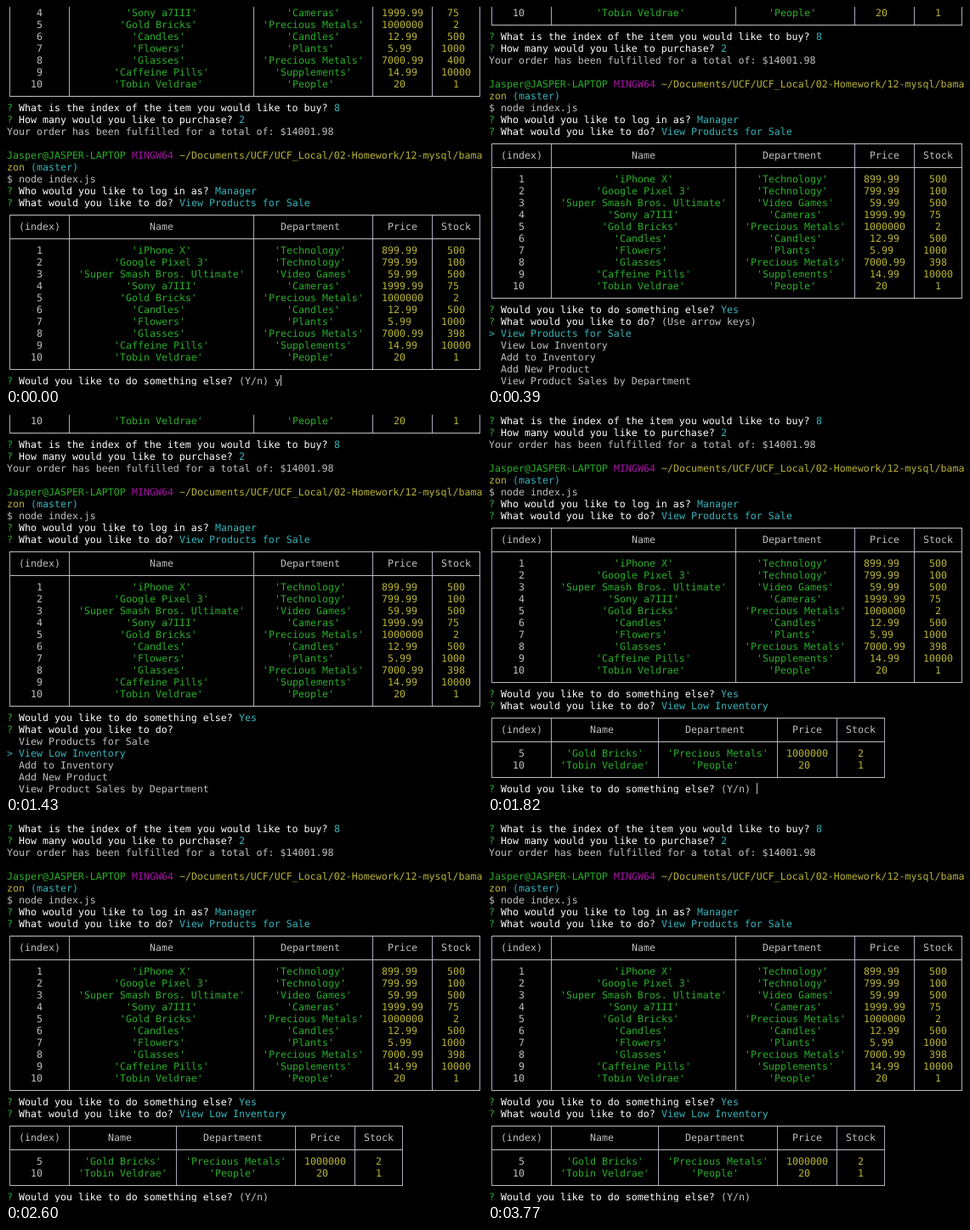
An HTML page for the animation above (3.9 s loop, 560 by 448 pixels).

```html
<!DOCTYPE html>
<html lang="en">
<head>
<meta charset="utf-8">
<title>Store manager terminal</title>
<style>
  html, body { margin: 0; width: 100%; height: 100%; overflow: hidden; background: #000; }
  svg { display: block; width: 560px; height: 448px; background: #000; }
  text {
    font: 11.627px "DejaVu Sans Mono", "Liberation Mono", monospace;
    text-rendering: geometricPrecision;
    white-space: pre;
  }
  path { fill: none; stroke-width: 1; shape-rendering: crispEdges; }
  .bars { stroke: #aca6b8; }
  .rule { stroke: #bfbfbf; }
</style>
</head>
<body>
<svg id="stage" viewBox="0 0 560 448"></svg>
<script>
const NS = 'http://www.w3.org/2000/svg';
const CELL_W = 7, CELL_H = 14, PAD = 1, ROWS = 32;
const LOOP = 3900, BLINK = 530;
const GREY = '#bfbfbf', WHITE = '#ffffff', GREEN = '#2aae2a',
      YELLOW = '#b8b435', CYAN = '#34b4ba', MAGENTA = '#a414a4';

const stage = document.getElementById('stage');
const colX = col => PAD + col * CELL_W;

function add(parent, tag, attrs, content) {
  const el = document.createElementNS(NS, tag);
  for (const key in attrs) el.setAttribute(key, attrs[key]);
  if (content) el.textContent = content;
  return parent.appendChild(el);
}

// A line holds text runs, plus table borders where it has any.
function line(...pairs) {
  const runs = [];
  let col = 0;
  for (const [color, text] of pairs) {
    runs.push({ col, color, text });
    col += text.length;
  }
  return { runs };
}

const ask = (question, answer = '', color = CYAN) =>
  line([GREEN, '? '], [WHITE, question + ' '], [color, answer]);

const HEADER = ['(index)', 'Name', 'Department', 'Price', 'Stock'];

function table(items) {
  const all = [HEADER, ...items];
  const widths = HEADER.map((_, i) => Math.max(...all.map(r => r[i].length)) + 2);
  const bars = [0];
  widths.forEach(w => bars.push(bars[bars.length - 1] + w + 1));

  const row = (cells, header) => ({
    bars, edge: 'row',
    runs: cells.map((text, i) => ({
      text,
      col: bars[i] + 1 + Math.floor((widths[i] - text.length) / 2),
      color: header || i === 0 ? GREY : text[0] === "'" ? GREEN : YELLOW
    }))
  });
  const border = edge => ({ bars, edge, runs: [] });

  return [border('top'), row(HEADER, true), border('middle'),
          ...items.map(item => row(item)), border('bottom')];
}

const products = glasses => [
  ['iPhone X', 'Technology', '899.99', '500'],
  ['Google Pixel 3', 'Technology', '799.99', '100'],
  ['Super Smash Bros. Ultimate', 'Video Games', '59.99', '500'],
  ['Sony a7III', 'Cameras', '1999.99', '75'],
  ['Gold Bricks', 'Precious Metals', '1000000', '2'],
  ['Candles', 'Candles', '12.99', '500'],
  ['Flowers', 'Plants', '5.99', '1000'],
  ['Glasses', 'Precious Metals', '7000.99', glasses],
  ['Caffeine Pills', 'Supplements', '14.99', '10000'],
  ['Tobin Veldrae', 'People', '20', '1']
].map(([name, dept, price, stock], i) =>
  [String(i + 1), `'${name}'`, `'${dept}'`, price, stock]);

const stock = products('398');
const history = [
  ...table(products('400')),
  ask('What is the index of the item you would like to buy?', '8'),
  ask('How many would you like to purchase?', '2'),
  line([GREY, 'Your order has been fulfilled for a total of: $14001.98']),
  line(),
  line([GREEN, 'Jasper@JASPER-LAPTOP '], [MAGENTA, 'MINGW64 '],
       [YELLOW, '~/Documents/UCF/UCF_Local/02-Homework/12-mysql/bama']),
  line([YELLOW, 'zon '], [CYAN, '(master)']),
  line([GREY, '$ node index.js']),
  ask('Who would you like to log in as?', 'Manager'),
  ask('What would you like to do?', 'View Products for Sale'),
  ...table(stock)
];

const MORE = 'Would you like to do something else?';
const TODO = 'What would you like to do?';
const CHOICES = ['View Products for Sale', 'View Low Inventory', 'Add to Inventory',
                 'Add New Product', 'View Product Sales by Department'];

const menu = (selected, hint) => [
  ...history,
  ask(MORE, 'Yes'),
  ask(TODO, hint, GREY),
  ...CHOICES.map((choice, i) => i === selected
    ? line([CYAN, '> ' + choice])
    : line([GREY, '  '], [GREY, choice]))
];

const lowInventory = [
  ...history,
  ask(MORE, 'Yes'),
  ask(TODO, 'View Low Inventory'),
  ...table(stock.filter(item => Number(item[4]) < 10)),
  ask(MORE, '(Y/n)', GREY)
];

function addBorders(group, { bars, edge }, top) {
  const mid = top + CELL_H / 2;
  const center = col => colX(col) + CELL_W / 2;
  const from = edge === 'top' ? mid : top;
  const to = edge === 'bottom' ? mid + 1 : top + CELL_H;
  add(group, 'path', {
    class: 'bars', d: bars.map(col => `M${center(col)} ${from}V${to}`).join('')
  });
  if (edge !== 'row') {
    const last = bars[bars.length - 1];
    add(group, 'path', { class: 'rule', d: `M${center(0)} ${mid + 0.5}H${center(last)}` });
  }
}

function buildScreen(lines) {
  const group = add(stage, 'g', { display: 'none' });
  lines.slice(-ROWS).forEach((ln, r) => {
    const top = PAD + r * CELL_H;
    if (ln.bars) addBorders(group, ln, top);
    for (const { col, color, text } of ln.runs) {
      if (text.trim()) add(group, 'text', { x: colX(col), y: top + 11, fill: color }, text);
    }
  });
  return group;
}

const scenes = [
  { start: 0, lines: [...history, ask(MORE, '(Y/n) y', GREY)], cursor: 46 },
  { start: 390, lines: menu(0, '(Use arrow keys)') },
  { start: 1430, lines: menu(1, '') },
  { start: 1820, lines: lowInventory, cursor: 45 }
];
scenes.forEach(scene => { scene.group = buildScreen(scene.lines); });

const cursor = add(stage, 'rect', {
  y: PAD + (ROWS - 1) * CELL_H, width: 1, height: CELL_H, fill: GREY
});

function draw(time) {
  const t = time % LOOP;
  const current = scenes.filter(scene => scene.start <= t).pop();
  for (const scene of scenes) {
    scene.group.setAttribute('display', scene === current ? 'inline' : 'none');
  }
  const lit = Math.floor((t - current.start) / BLINK) % 2 === 0;
  cursor.setAttribute('display', current.cursor && lit ? 'inline' : 'none');
  cursor.setAttribute('x', colX(current.cursor || 0));
}

const begin = performance.now();
function tick() {
  draw(performance.now() - begin);
  requestAnimationFrame(tick);
}
tick();
</script>
</body>
</html>
```
